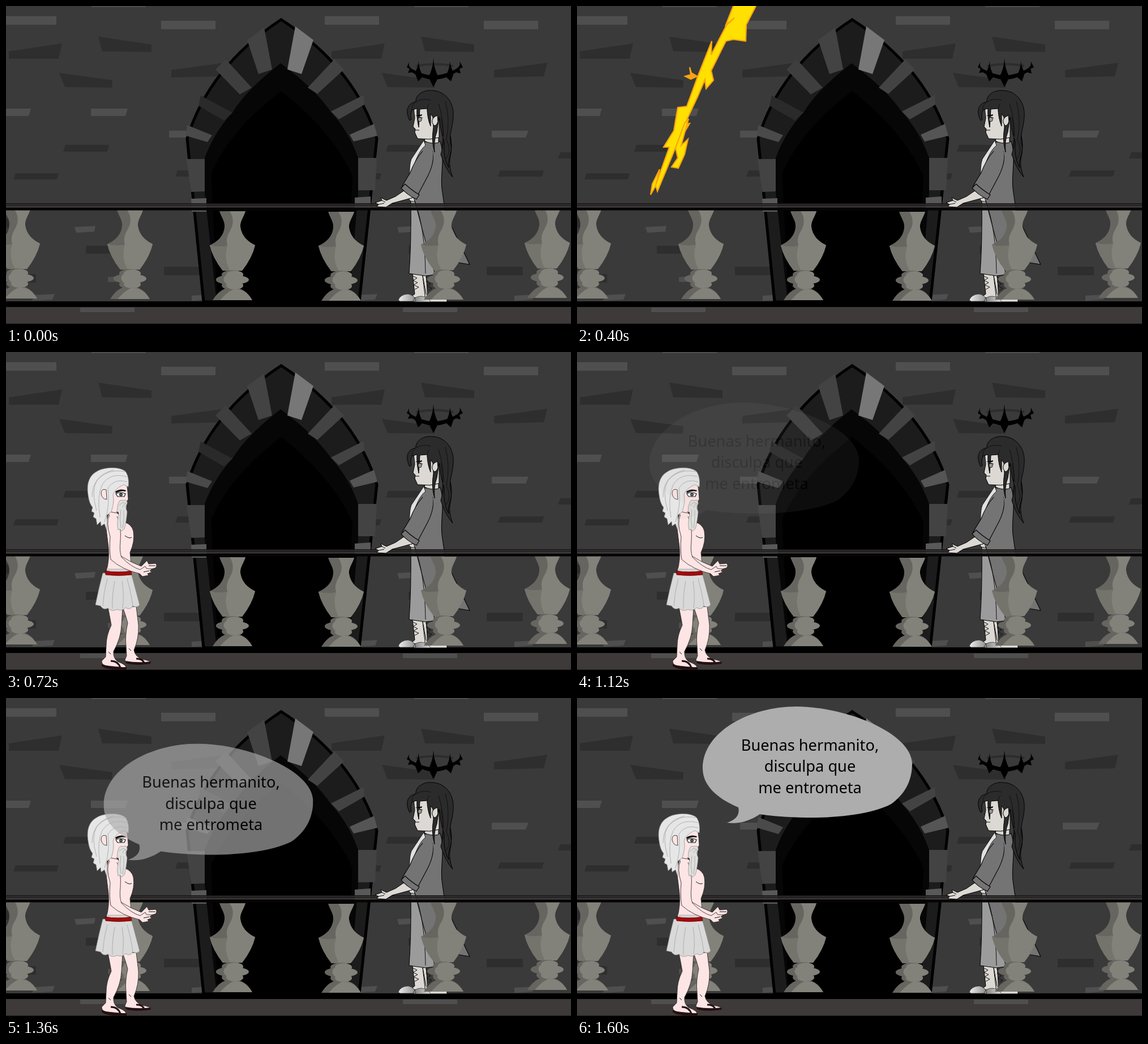
An HTML page for the animation above (2.68 s loop, 998 by 561 pixels).

```html
<!DOCTYPE html>
<html lang="es">
<head>
<meta charset="utf-8">
<title>Buenas hermanito</title>
<style>
html, body { margin: 0; width: 100%; height: 100%; overflow: hidden; background: #3a3a3a; }
svg { display: block; width: 100vw; height: 100vh; }

.lit { fill: #4f4f4f; }
.dim { fill: #2e2e2e; }
.skin { fill: #fde5e5; stroke: #2a1c1c; stroke-width: .8; }
.white { fill: #e6e6e6; stroke: #888; stroke-width: .7; }
.pale { fill: #dcd8d3; stroke: #000; stroke-width: 1; }
.coat { fill: #747474; stroke: #000; stroke-width: 1.1; }
.hair { fill: #2b2b2b; stroke: #000; stroke-width: 1; }
.line { fill: none; stroke: #111; stroke-width: 1; }
.fold { fill: none; stroke: #a2a2a2; stroke-width: .8; }
.skin, .white, .pale, .coat, .hair { stroke-linejoin: round; }

#bolt {
  fill: #ffe000; stroke: #f9a313; stroke-width: 2.2;
  transform-origin: 130px 333px;
  animation: strike 2680ms infinite;
}
#man { animation: appear 2680ms step-end infinite; }
#bubble { animation: drift 2680ms infinite, fade 2680ms infinite; }
#bubble text { font: 27.2px "Noto Sans", "Open Sans", sans-serif; text-anchor: middle; }

/* Every leg advances in 40 ms steps */
@keyframes strike {
  0% { visibility: hidden; transform: translate(179px, -320px) rotate(0deg); animation-timing-function: step-end; }
  5.97% { visibility: visible; transform: translate(179px, -320px) rotate(0deg); animation-timing-function: steps(6); }
  14.925% { visibility: visible; transform: translate(0px, 0px) rotate(0deg); animation-timing-function: steps(4); }
  20.895% { visibility: visible; transform: translate(-102px, 182px) rotate(8deg); animation-timing-function: steps(3); }
  25.373% { visibility: visible; transform: translate(20px, 242px) rotate(20deg); animation-timing-function: step-end; }
  26.865%, 100% { visibility: hidden; transform: translate(20px, 242px) rotate(20deg); }
}
@keyframes appear {
  0% { visibility: hidden; }
  26.865%, 100% { visibility: visible; }
}
@keyframes drift {
  0% { transform: translate(-94px, 74px); animation-timing-function: step-end; }
  41.79% { transform: translate(-94px, 74px); animation-timing-function: steps(4); }
  47.76% { transform: translate(-75px, 92px); animation-timing-function: steps(4); }
  53.73% { transform: translate(-24px, 39px); animation-timing-function: steps(2); }
  56.716% { transform: translate(-10px, 17px); animation-timing-function: steps(2); }
  59.7%, 100% { transform: translate(0px, 0px); }
}
@keyframes fade {
  0% { opacity: 0; animation-timing-function: step-end; }
  41.79% { opacity: .077; animation-timing-function: steps(4); }
  47.76% { opacity: .47; animation-timing-function: steps(4); }
  53.73% { opacity: .86; animation-timing-function: steps(4); }
  59.7%, 100% { opacity: 1; }
}
</style>
</head>
<body>
<svg viewBox="0 0 998 561" preserveAspectRatio="none">
<defs>
  <g id="bricks">
    <path class="lit" d="M-7 18H89V33H-7Z M151-6H247V2H151Z M274 26H370V41H274Z M-21 181H44L40 194H-21Z
      M150 181H215L211 194H150Z M288 220H353L348 232H288Z M121 390L158 388L156 398L124 400Z
      M180 478L215 476L211 486L180 487Z M50 510L86 508L82 518L46 520Z M328 511L364 509L360 518L328 520Z"/>
    <path class="dim" d="M5 80L99 66L93 93H5Z M163 54L257 68V81L170 80Z M94 118L188 131L187 144L104 143Z
      M292 113L386 100L380 124L292 126Z M105 245H182L179 257H101Z M17 295H93L90 306H13Z M303 290H380L377 301H299Z
      M409 258H480V269H405Z M141 423H204V437H141Z M279 460H343V475H279Z M-10 473H53V488H-10Z M-30 375H5V391H-30Z"/>
  </g>
  <g id="baluster">
    <path fill="#66655f" d="M-23 360H23C19 372 13 378 14 388Q17 409 40 420Q35 442 17 465H-17Q-35 442-40 420Q-16 409-14 388C-13 378-19 372-23 360Z"/>
    <path fill="#82827a" d="M-5 360H23C19 372 13 378 14 388Q17 409 40 420Q35 442 17 465H-17Q-35 442-40 420Q-24 425-9 421Q-13 408-4 394C3 382 2 370-5 360Z"/>
    <path fill="#74736c" d="M-40 420Q-24 425-9 421Q-16 444-4 465H-17Q-35 442-40 420Z"/>
    <g fill="#66655f">
      <ellipse cy="472" rx="19" ry="8"/><ellipse cy="491" rx="19" ry="8"/>
      <path d="M-35 517Q-24 499-10 496H10Q25 499 35 517Z"/>
    </g>
    <g fill="#82827a">
      <ellipse cx="4" cy="472" rx="15" ry="7"/><ellipse cx="4" cy="491" rx="15" ry="7"/>
      <path d="M-22 517Q-8 501 2 498H12Q26 501 35 517Z"/>
      <ellipse cy="481" rx="29" ry="8.5"/>
    </g>
    <path fill="#66655f" d="M-29 481A29 8.5 0 0 1-12 473Q-20 481-10 489A29 8.5 0 0 1-29 481Z"/>
  </g>
  <linearGradient id="shoe"><stop stop-color="#eee"/><stop offset=".55" stop-color="#8b8b8b"/><stop offset="1" stop-color="#ddd"/></linearGradient>
</defs>

<rect width="998" height="561" fill="#3a3a3a"/>
<use href="#bricks"/><use href="#bricks" x="570"/>

<!-- doorway -->
<path d="M349 522L320 234Q358 108 486 24Q616 108 655 234L624 522Z" fill="#1c1c1c" stroke="#000" stroke-width="5"/>
<path d="M372 522L351 330V268Q368 222 400 188Q424 148 485 101Q546 146 574 187Q606 222 622 268V330L606 522Z" fill="#060606"/>
<path d="M374 522L362 296Q396 218 486 150Q576 220 612 300L602 522Z"/>
<g fill="#434343">
  <path d="M319 270H351V327L327 328Z M622 268H655L652 325H622Z M456 38L470 112L446 120L426 60Z
    M580 94L597 112L550 155L533 144Z M632 157L633 174L588 200L574 186Z"/>
  <path d="M388 94L434 144L413 156L370 112Z" fill="#3e3e3e"/>
  <path d="M344 158L400 188L385 202L340 176Z" fill="#2a2a2a"/>
  <path d="M320 210L364 228L356 240L318 229Z" fill="#4a4a4a"/>
  <path d="M650 208L656 229L614 239L607 227Z" fill="#555"/>
  <path d="M511 36L543 60L522 120L497 112Z" fill="#777"/>
  <path d="M327 340L354 339V363H328Z M616 338L644 336V358H616Z" fill="#595959"/>
</g>

<!-- floor -->
<rect y="521" width="998" height="10"/>
<rect y="531" width="998" height="30" fill="#3e3a39"/>
<path class="lit" d="M131 532H227V540H131Z M701 532H797V540H701Z"/>
<rect y="560" width="998" height="1" fill="#1c1a1a"/>

<!-- dark brother -->
<path d="M724 106Q757 99 790 106" fill="none" stroke="#2d2d2d" stroke-width="4"/>
<path d="M713 97Q709 106 717 111Q735 121 755 123Q778 121 795 111Q804 106 801 97L807 108L801 111L803 119L795 117Q778 129 755 130Q735 129 717 117L710 118L713 111L708 108Z
  M729 97Q729 112 737 124L728 133L722 118Q728 108 729 97Z
  M755 92Q756 112 764 125L755 143L746 125Q754 112 755 92Z
  M784 97Q785 108 791 118L786 133L776 124Q784 112 784 97Z"/>
<path class="coat" d="M766 345L819 456L770 448Z" fill="#666"/>
<path class="pale" d="M718 472L722 508L714 514L745 516L742 472Z"/>
<path class="line" d="M718 476L726 480L719 484L727 488L720 492L729 496L722 500M741 478L748 482L742 486L750 490L743 494L752 498L746 502" stroke-width="2"/>
<path class="pale" d="M736 476L742 508L750 516H779V522H740V510Z"/>
<path d="M693 519Q696 509 710 508Q722 510 724 521H696Z M719 520Q722 512 734 512Q746 514 750 522H721Z" fill="url(#shoe)" stroke="#333" stroke-width=".8"/>
<path class="coat" d="M738 240L767 239C776 265 767 296 770 322Q773 345 776 362L790 440L760 476L741 472L740 418L716 345L714 300L716 274Z"/>
<path d="M715 343L722 343Q730 375 741 415L758 474L741 476L712 472Q716 420 715 343Z" fill="#9b9b9b" stroke="#000"/>
<path class="line" d="M722 345Q740 390 741 472"/>
<path d="M738 237L741 246Q727 256 716 296L713 306Q712 280 716 270Z" fill="#e0e0e0" stroke="#000" stroke-width=".8"/>
<path class="pale" d="M742 228H764V241Q750 244 739 238Z"/>
<path class="hair" d="M764 180Q778 230 768 262Q776 287 789 302Q782 284 784 270Q790 245 784 226L786 180Z"/>
<path class="pale" d="M720 178L722 198L719 213L723 217L722 223L727 234L748 235L765 232V190L748 174Z"/>
<path class="hair" d="M713 202C705 186 708 172 724 169C723 156 738 148 751 149C776 149 792 170 790 196C789 216 781 228 786 246C789 260 779 270 782 285Q772 268 774 240Q768 222 765 196L761 222Q755 238 757 258Q751 238 755 214L754 196L750 190L750 212Q744 198 744 181L731 182L729 214Q725 196 726 181L718 183Q713 190 716 200Z"/>
<path class="pale" d="M753 206Q751 197 762 193L763 204Q760 212 756 211Z"/>
<path class="line" d="M724 169Q716 174 717 184M724 169Q736 162 750 166M764 172Q772 196 773 230M776 168Q785 200 778 236Q788 256 777 270M768 196Q774 224 770 250M748 172Q742 178 745 190" stroke-width=".8"/>
<path d="M722 194L735 191L734 194Z"/>
<ellipse cx="731" cy="200" rx="3.2" ry="3.8" fill="#999" stroke="#222"/>
<path class="line" d="M726 198Q731 194 736 198M722 219H730"/>

<!-- balustrade -->
<use href="#baluster" x="20" y="-1"/><use href="#baluster" x="219"/><use href="#baluster" x="400" y="2"/>
<use href="#baluster" x="592" y="3"/><use href="#baluster" x="773" y="1"/><use href="#baluster" x="956" y="-2"/>
<g id="rail">
  <rect y="348" width="998" height="5.5" fill="#2c2829" opacity=".9"/>
  <rect y="348" width="998" height="1" fill="#141213"/>
  <rect y="352.5" width="998" height="1" fill="#141213"/>
  <rect y="353.5" width="998" height="2" fill="#4a4647"/>
  <rect y="355.5" width="998" height="5" fill="#060505"/>
</g>

<!-- arm on the rail -->
<path class="pale" d="M710 321L688 336L672 343L662 338L664 343L652 347L658 350L655 354L671 355L682 348L719 338Z"/>
<path class="line" d="M658 350L668 348M664 343L670 346" stroke-width=".8"/>
<path class="coat" d="M736 256Q722 272 714 294L700 317L727 334L745 300Q758 274 753 256Z"/>
<path d="M736 255L753 255Q757 266 748 290L739 300Z" fill="#747474"/>
<path class="coat" d="M705 314Q715 324 730 333L725 341Q708 333 698 321Z" fill="#666"/>
<path class="pale" d="M712 340L720 338L722 345L714 344Z" stroke-dasharray="2 1"/>

<!-- bearded brother -->
<g id="man">
  <path class="skin" d="M180 450Q184 470 186 482Q177 500 177 518L176 538L169 545Q169 554 181 554L211 557Q215 553 197 546Q189 540 190 528Q203 505 204 482L206 450Z"/>
  <path class="skin" d="M206 450Q212 466 215 478Q210 500 212 518L213 536L210 543Q211 549 224 549L254 549Q258 545 240 542Q228 537 226 526Q235 505 234 482L230 449Z"/>
  <path d="M169 550Q180 556 213 556V560Q178 562 169 554Z M211 545Q232 549 256 546L255 550Q226 554 212 549Z" fill="#241012"/>
  <path d="M185 545Q198 545 202 557M230 541Q242 541 244 549" fill="none" stroke="#241012" stroke-width="3"/>
  <path class="line" d="M181 529L185 533M217 523L221 527" stroke-width=".7"/>
  <path class="skin" d="M184 280Q176 296 177 312L181 345Q183 366 177 388H220Q222 372 219 354Q228 334 225 316Q222 304 209 300L196 278Z"/>
  <path class="line" d="M210 324Q218 330 222 327" stroke-width=".9"/>
  <path class="white" d="M171 390H221Q227 412 236 446Q232 452 224 448Q220 456 211 451Q204 458 196 454Q188 459 180 452Q172 456 167 448L158 446Q164 416 171 390Z" style="fill:#d9d9d9"/>
  <path class="fold" d="M179 400Q172 425 171 448M192 404Q187 430 188 453M205 404Q209 430 206 452M214 400Q222 430 224 448"/>
  <path d="M178 382L219 382V386H178Z" fill="#ccc"/>
  <path d="M175 386Q198 390 221 386L222 393Q198 396 176 393Z" fill="#a30a0c" stroke="#520000" stroke-width=".7"/>
  <path class="skin" d="M203 360Q222 372 239 378L249 368L252 374L264 373Q268 376 264 381L252 384L234 386L200 375Z"/>
  <path class="skin" d="M183 287Q176 300 184 326Q182 350 185 366Q205 384 236 391L241 396L252 394L250 391L258 388L254 386L258 383L248 382L246 378L237 384Q222 380 204 362Q200 352 202 334Q204 306 196 290"/>
  <path class="line" d="M243 388L253 386M252 377L264 377" stroke-width=".6"/>

  <path class="skin" d="M184 240L213 230L215 246L216 260L213 264V276L206 286L184 282Z"/>
  <path class="white" d="M212 212C204 202 174 202 160 211C143 220 143 240 145 252Q147 268 153 274L151 281L156 284L154 291L159 294L161 305L167 299L168 307L174 303L178 315Q179 298 178 288L186 282Q192 263 189 252Q192 241 208 234L216 238Q218 222 212 212Z"/>
  <path class="skin" d="M177 243Q168 240 168 250Q170 260 178 260Z"/>
  <path class="fold" d="M210 211Q178 205 160 228Q150 244 160 280M213 220Q184 212 170 234Q160 254 166 292M214 229Q192 222 180 240Q184 270 174 300M190 208Q152 218 152 256"/>
  <path d="M193 246Q202 240 212 244L211 246Q203 244 194 249Z" fill="#111"/>
  <path d="M194 250Q202 246 211 250L209 255H197Z" fill="#fff" stroke="#111" stroke-width="1.2"/>
  <circle cx="203" cy="251.5" r="2.6" fill="#536567" stroke="#111"/>
  <path class="white" d="M199 266Q200 260 207 262Q215 259 214 268L211 273L214 282Q212 303 209 312L204 316L201 312L198 314Q195 302 199 288Q194 276 199 266Z" style="fill:#dfdfdd"/>
  <path class="fold" d="M200 271Q206 262 212 268Q207 268 206 274M203 278Q200 295 203 310M208 279Q209 295 206 311"/>
  <path d="M194 281L199 283V287Z" fill="#3a2020"/>
</g>

<g id="bolt">
  <path d="M130 333L133 314L146 288L139 316L163 249L153 249L171 220L178 179L194 177L213 125L238 62L237 86L264 34L278 21L263 33L276 0L300-58L322-66L350-130L346-150L402-224L410-205L511-349L448-235L424-196L429-172L392-128L362-66L340-58L316 0L299 33L298 62L276 59L263 62L237 114L241 131L228 146L226 130L213 160L190 209L199 207L174 250L142 327L139 317Z"/>
  <path d="M190 207L197 199L184 246L196 235L190 262L179 286L167 284L178 268L174 250Z"/>
  <path d="M212 124L202 118L199 108L201 121L191 124L201 129Z" fill="#f9a313"/>
</g>

<g id="bubble">
  <path fill="#adadad" d="M285 193C245 176 222 153 222 124C222 60 304 15 388 15C478 16 590 62 592 115C592 149 577 171 555 187C520 206 450 212 405 211Q355 210 323 205C305 217 285 223 265 220C280 215 288 207 285 193Z"/>
  <text x="411.5" y="92.5">Buenas hermanito,</text>
  <text x="411.5" y="130">disculpa que</text>
  <text x="411.5" y="167.5">me entrometa</text>
</g>
</svg>
</body>
</html>
```
